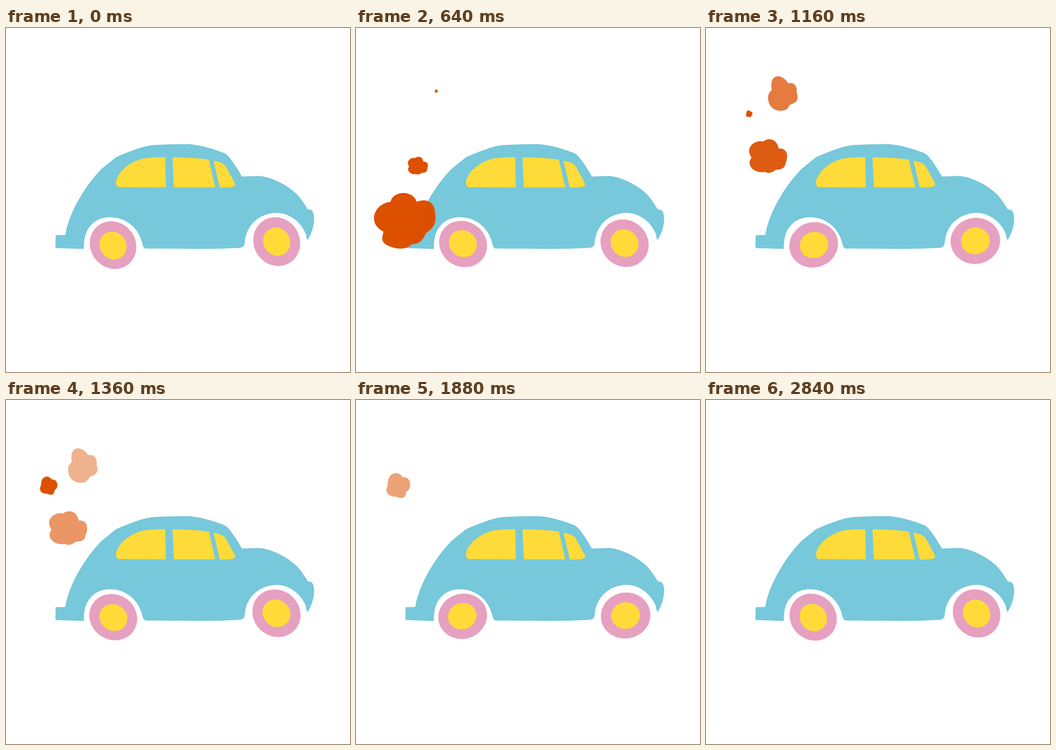
Animation of 748 by 748 pixels, one loop 2.88 s. Source, as an HTML page without scripts:

```html
<!DOCTYPE html>
<html lang="en">
<head>
<meta charset="utf-8">
<title>Puffing car</title>
<style>
  html, body { margin: 0; width: 100%; height: 100%; overflow: hidden; background: #fff; }
  svg { display: block; width: 100vw; height: 100vh; }

  .body { fill: #76c8da; }
  .glass, .hub { fill: #ffdb39; }
  .tyre { fill: #e6a0c0; }
  .puff { fill: #dc5000; }

  .wheel, .puff { animation: 2880ms linear infinite; }

  /* Two turns per loop, slightly off centre */
  .wheel { animation-name: roll; }
  .rear { transform-origin: 233px 470.9px; }
  .front { transform-origin: 586px 465.8px; }
  @keyframes roll { to { transform: rotate(720deg); } }

  /* Each puff grows from its own point, then fades */
  .p1 { transform-origin: 112px 462px; animation-name: puff1; }
  .p2 { transform-origin: 134px 322.5px; animation-name: puff2; }
  .p3 { transform-origin: 175.5px 136.5px; animation-name: puff3; }
  .p4 { transform-origin: 94.7px 186.7px; animation-name: puff4; }

  @keyframes puff1 {
    0% { transform: scale(0); opacity: 1; }
    16.667% { transform: scale(1); }
    22.222% { opacity: 1; }
    38.889%, 100% { transform: scale(1); opacity: 0; }
  }
  @keyframes puff2 {
    0%, 13.194% { transform: scale(.012); }
    30.556% { transform: scale(1); }
    0%, 38.889% { opacity: 1; }
    59.722%, 100% { transform: scale(1); opacity: 0; }
  }
  @keyframes puff3 {
    0%, 20.833% { transform: scale(0); opacity: 1; }
    34.722% { transform: scale(1); opacity: 1; }
    56.944%, 100% { transform: scale(1); opacity: 0; }
  }
  @keyframes puff4 {
    0%, 36.111% { transform: scale(0); opacity: 1; }
    51.389% { transform: scale(1); }
    55.556% { opacity: 1; }
    76.389%, 100% { transform: scale(1); opacity: 0; }
  }
</style>
</head>
<body>
<svg viewBox="0 0 748 748">
  <path class="body" d="M108 450.5 L129 450 C135 408 166 350 207 307 Q222 295 239 281 L246 278
    C282 263 306 254 330 254 Q364 252 398 252.5 C427 255 453 264 472 271 Q480 274 486 282
    Q497 295 513 323 L543 322 Q555 321 572 326 Q608 338 633 362 Q642 371 656 394 Q658 395 663 395.5
    Q670 399 670 417 Q669 440 656 461 Q653 458 652 448 C639 417 612 402 589 402
    C552 402 521 428 519 468 Q518 477 508 478 Q455 481 400 480 L303 479.5 Q299 478 297 471
    C290 436 262 411.5 226 411.5 C206 411.5 192 419 182 432 Q169 447 169 480.5 L109 478.5
    Q107 478 107.5 470 Z"/>
  <g class="glass">
    <path d="M346.500 281 L347.500 346.500 L245 346 Q239 344 239 337 C240 312 276 285 306 283 Q325 280 346.500 281 Z"/>
    <path d="M362 281 Q405 281.500 441 286 L455 346.500 L365 346.500 Z"/>
    <path d="M451 288.500 Q467 291 475 297 Q480 304 498 338 Q500 343 494 345 Q484 347 465 347 Z"/>
  </g>

  <g class="wheel rear">
    <ellipse class="tyre" rx="49" ry="53.3" transform="translate(232.8 472.1) rotate(-37)"/>
    <ellipse class="hub" rx="28.5" ry="31.2" transform="translate(232.8 473) rotate(-37)"/>
  </g>
  <g class="wheel front">
    <ellipse class="tyre" rx="50" ry="54" transform="translate(588.6 464.6) rotate(-30)"/>
    <ellipse class="hub" rx="29" ry="31.4" transform="translate(588.6 464.6) rotate(-30)"/>
  </g>

  <path class="puff p1" d="M75 378 C81 353 124 352 132 378 C155 369 171 380 172 402
    C176 424 168 436 152 446 C146 461 137 471 122 470 C108 484 85 480 74 475
    C57 468 54 462 60 443 C45 435 39 425 39 413 C40 395 55 380 75 378 Z"/>
  <path class="puff p2" d="M124 247 C132 239 154 238 158 262 C171 261 177 269 176.500 280
    C175 289 175 292 173 293 C173 303 165 309 152 308 C143 315 136 317 129 313
    C111 316 95 307 94.500 292 C95 288 97 285 99 282 C90 268 93 259 103 251 C111 246 118 245 124 247 Z"/>
  <path class="puff p3" d="M143 135 C139 110 149 105 157 105 C167 106 173 112 179 120
    C191 117 199 126 197 139 C197 142 200 147 199 151 C199 160 192 164 182 167
    C178 177 171 180 163 180 C146 180 135 168 135 152 C135 144 138 139 143 135 Z"/>
  <path class="puff p4" d="M69 184 C69 166 78 159 87 159 C95 160 99 164 102 168
    C112 167 118 174 118 185 C117 194 114 197 109 200 C109 209 105 213 98 213
    C93 213 90 211 87 210 C77 211 66 206 66 195 C66 190 69 188 69 184 Z"/>
</svg>
</body>
</html>
```
